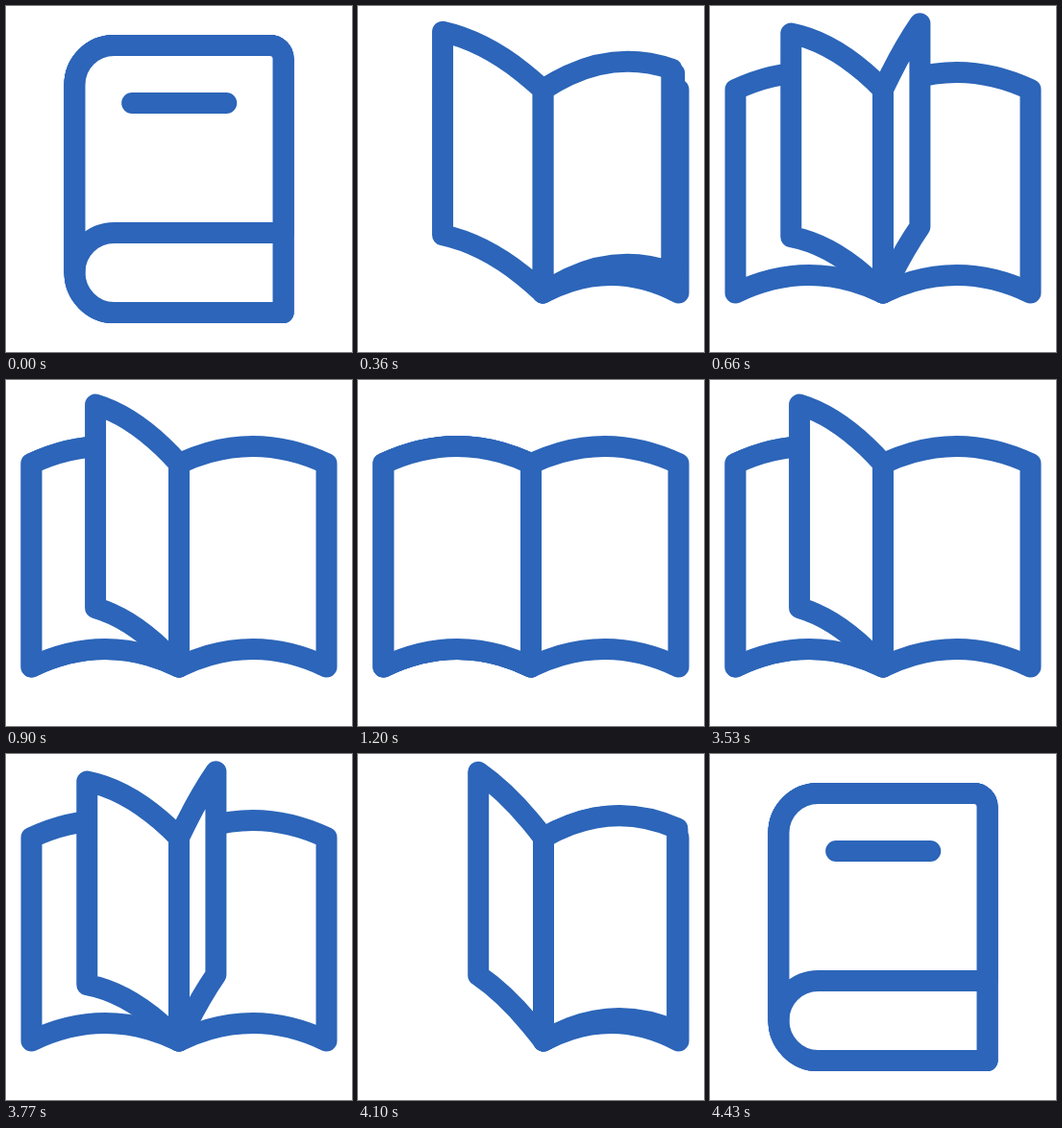
Animation, 360 px wide and 360 px high, one loop 5.46 s. Source, as an HTML page with a canvas:

```html
<!DOCTYPE html>
<html lang="en">
<head>
<meta charset="utf-8">
<title>Book</title>
<style>
  html, body { margin: 0; width: 100%; height: 100%; overflow: hidden; background: #fff; }
  canvas { display: block; width: 360px; height: 360px; }
</style>
</head>
<body>
<canvas id="stage" width="360" height="360"></canvas>
<script>
const ctx = document.getElementById('stage').getContext('2d');
const BLUE = '#2c65b9';
const STROKE = 22;
const LOOP = 5460, OPENED = 1200, CLOSING = 3260, CLOSED = 4430, STEP = 30;

const mix = (a, b, u) => a + (b - a) * u;
const mixPoint = (p, q, u) => [mix(p[0], q[0], u), mix(p[1], q[1], u)];
const progress = (t, start, length) => Math.min(1, Math.max(0, (t - start) / length));
const easeInOut = u => (1 - Math.cos(Math.PI * u)) / 2;

// Rise of a sheet's free edge, slightly higher past the vertical.
const liftAt = angle => 72 * Math.sin(angle) * (1 - 0.06 * Math.cos(angle));

// Position within the opening move; closing runs it backwards.
function openingTime(t) {
  if (t < CLOSING) return Math.min(OPENED, Math.floor(t / STEP) * STEP);
  const elapsed = Math.floor((t - CLOSING) / STEP) * STEP;
  return Math.max(0, CLOSED - CLOSING - elapsed);
}

// Curve from hinge to free edge as two corner segments: [hinge, c1, middle, c2, edge].
function sheetEdge({ hinge: hingeX, morph, angle, width }, hingeY, closedY, openY, bulge) {
  const c = Math.cos(angle), lift = liftAt(angle);
  const hinge = [hingeX, hingeY];
  const edgeX = hingeX + width * c;

  const flatY = closedY - lift;
  const cornerX = hingeX + 41 * c;
  const closed = [hinge, [hingeX, flatY], [cornerX, flatY],
    [(cornerX + edgeX) / 2, flatY], [edgeX, flatY]];

  const tip = [edgeX, openY - lift];
  const middle = mixPoint(hinge, tip, 0.5);
  const control = [middle[0], middle[1] - bulge * Math.abs(c) ** 1.25];
  const c1 = mixPoint(hinge, control, 0.2);
  const c2 = mixPoint(control, tip, 0.2);
  const open = [hinge, c1, mixPoint(c1, c2, 0.2), c2, tip];

  return closed.map((p, i) => mixPoint(p, open[i], morph));
}

function corner(a, c, b, k) {
  const p = mixPoint(a, c, k), q = mixPoint(b, c, k);
  ctx.bezierCurveTo(p[0], p[1], q[0], q[1], b[0], b[1]);
}

function drawSheet(sheet) {
  const { morph, angle } = sheet;
  const top = sheetEdge(sheet, mix(82, 87, morph), 41, 87, 36);
  const bottom = sheetEdge(sheet, mix(277, 298.5, morph), sheet.closedBottom, 298.5, 37);
  const k = mix(0.552, 2 / 3, morph);
  const radius = 14 * (1 - morph);
  const tip = top[4];
  const beforeTip = [tip[0] - radius * Math.cos(angle), tip[1]];
  const afterTip = [tip[0], tip[1] + radius];

  ctx.beginPath();
  ctx.moveTo(...bottom[0]);
  ctx.lineTo(...top[0]);
  corner(top[0], top[1], top[2], k);
  corner(top[2], top[3], beforeTip, k);
  corner(beforeTip, tip, afterTip, k);
  ctx.lineTo(...bottom[4]);
  corner(bottom[4], bottom[3], bottom[2], k);
  corner(bottom[2], bottom[1], bottom[0], k);
  ctx.closePath();
  ctx.fill();
  ctx.lineWidth = STROKE;
  ctx.stroke();

  if (sheet.title && Math.cos(angle) > 0.05) drawTitle(sheet, tip[1]);
}

function drawTitle({ hinge, width, angle }, tipY) {
  const c = Math.cos(angle), lift = liftAt(angle);
  const point = u => [hinge + width * c * u, tipY + 60 + lift * (1 - u)];
  ctx.lineWidth = STROKE * c;
  ctx.beginPath();
  ctx.moveTo(...point(0.275));
  ctx.lineTo(...point(0.727));
  ctx.stroke();
}

function draw(t) {
  const morph = progress(t, 0, 310);
  const hinge = mix(mix(71.5, 193, morph), 180, easeInOut(progress(t, 330, 220)));
  const page = { morph, hinge, width: mix(288.5, 333.5, morph) - hinge, closedBottom: 319 };
  const turn = progress(t, 0, 570);

  const sheets = [
    { ...page, angle: 0 },
    { ...page, angle: Math.PI * progress(t, 290, 882) },
    { ...page, angle: Math.PI * progress(t, 310, 490) },
    { ...page, angle: Math.PI * easeInOut(turn), width: mix(217, 153.5, turn),
      closedBottom: 236, title: true }
  ];
  // The steeper a sheet stands, the nearer it is to the viewer.
  sheets.sort((a, b) => Math.sin(a.angle) - Math.sin(b.angle));

  ctx.fillStyle = '#fff';
  ctx.fillRect(0, 0, 360, 360);
  ctx.strokeStyle = BLUE;
  ctx.lineCap = ctx.lineJoin = 'round';
  sheets.forEach(drawSheet);
}

const begin = performance.now();
function frame() {
  draw(openingTime((performance.now() - begin) % LOOP));
  requestAnimationFrame(frame);
}
frame();
</script>
</body>
</html>
```
